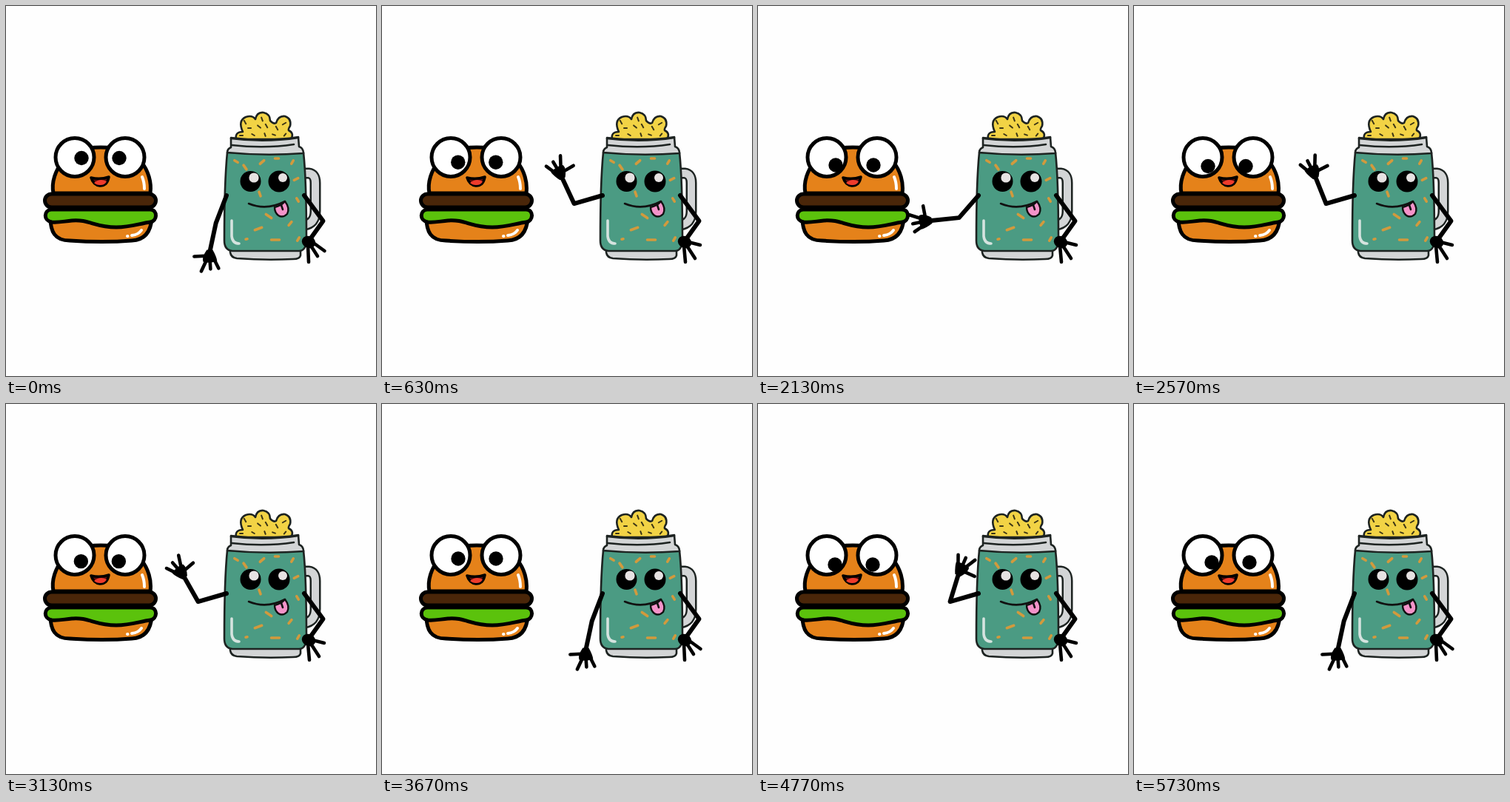
These frames come from a looping animation (500x500 px, 5760 ms). An HTML page:

```html
<!DOCTYPE html>
<html lang="en">
<head>
<meta charset="utf-8">
<title>Burger and mug</title>
<style>
  html, body { margin: 0; width: 100%; height: 100%; overflow: hidden; background: #fefefe; }
  svg { display: block; width: 100vw; height: 100vh; }
  .line { fill: none; stroke-linecap: round; stroke-linejoin: round; }
  .thick { stroke: #000; stroke-width: 5; stroke-linejoin: round; }
  .thin { stroke: #1d2321; stroke-width: 2.6; stroke-linejoin: round; stroke-linecap: round; }
  .arm { stroke: #000; stroke-width: 6; }
  .finger { stroke: #000; stroke-width: 4.6; }
  .shine { stroke: #fff; }
  .bun { fill: #e5821a; }
  .glass { fill: #d3d5d6; }
</style>
</head>
<body>
<svg viewBox="0 0 500 500">
  <g id="burger">
    <path class="thick bun" d="M64 253C61 238 67 222 76 211C87 196 105 191 128 191C153 191 172 198 183 211C192 222 197 238 195 253Z"/>
    <path class="line shine" stroke-width="4" d="M184 231Q187 238 187 247"/>
    <path class="thick bun" d="M60 286C60 305 66 317 86 317C115 319 145 319 170 317C188 316 196 304 197 286Z"/>
    <path class="line shine" stroke-width="4" d="M164 311h.5M170 310Q179 309 183 303"/>
    <path class="thick" fill="#5bc20c" d="M61 275H195C206 276 204 291 195 292C180 294 169 299 149 299C120 299 112 288 89 290C78 291 70 293 62 292C50 290 51 276 61 275Z"/>
    <rect class="thick" fill="#4a2609" x="52.5" y="254" width="150" height="18" rx="9"/>
    <g class="thick" fill="#fff">
      <circle cx="93" cy="204.500" r="26"/>
      <circle cx="161" cy="204.500" r="26"/>
    </g>
    <g id="pupils">
      <circle r="9.700"/>
      <circle cx="51" r="9.700"/>
    </g>
    <path fill="#5d0d0a" stroke="#000" stroke-width="3.600" stroke-linejoin="round" d="M115 232Q127 235 139 231Q137 243 127 243Q118 242 115 232Z"/>
    <path fill="#ee3b2c" d="M119 239Q127 232 136 237Q134 242 127 242Q122 242 119 239Z"/>
  </g>

  <g id="mug">
    <path class="line" stroke="#1d2321" stroke-width="15" d="M403 226H409Q418 227 418 239V277Q418 294 403 296"/>
    <path class="line glass" style="fill:none" stroke="#d3d5d6" stroke-width="10" d="M403 226H409Q418 227 418 239V277Q418 294 403 296"/>
    <path class="thin" fill="#f2d345" d="M311 180Q309 170 320 170Q313 155 324 150Q333 147 337 153Q339 143 348 144Q357 146 357 155Q362 160 365 158Q368 148 377 149Q386 152 384 162Q381 167 382 168Q390 172 385 180Z"/>
    <g id="kernels" class="line" stroke="#3b3516" stroke-width="2"></g>
    <path class="thin glass" d="M303 329H398V337Q397 342 388 342Q350 344 312 341Q304 340 303 333Z"/>
    <path class="thin" fill="#4b9b83" d="M299 198H402Q406 235 406 317Q405 331 396 331H306Q295 330 295 317Q295 238 299 198Z"/>
    <path class="thin glass" d="M304 178Q350 184 395 177L396 190Q402 192 402 199Q350 203 299 198Q299 193 304 191Z"/>
    <path class="line thin" stroke-width="1.500" d="M305 188Q350 193 389 187M304 179Q350 185 395 178"/>
    <g id="sprinkles" class="line" stroke="#d29a3d" stroke-width="3.600"></g>
    <path class="line" stroke="#d5e3df" stroke-width="3.600" d="M305 290V311Q306 321 315 321"/>
    <circle cx="330.500" cy="237" r="14"/>
    <circle cx="369" cy="237" r="14.500"/>
    <circle cx="335" cy="232" r="6.600" fill="#e6e2e2"/>
    <circle cx="374" cy="232" r="6" fill="#e6e2e2"/>
    <path fill="#f493c9" stroke="#111" stroke-width="2.400" stroke-linejoin="round" d="M363 272Q372 270 377 264Q384 273 380 281Q374 287 368 283Q363 279 363 272Z"/>
    <path class="line" stroke="#111" stroke-width="2.600" d="M328 267Q352 277 377 264M372 269L374 275"/>
  </g>

  <g id="rightArm">
    <path class="line arm" d="M403 256L428.500 290.500L411 315"/>
    <path class="line finger" id="rightFingers"/>
    <ellipse cx="409" cy="319" rx="9.500" ry="8" transform="rotate(25 409 319)"/>
  </g>

  <g id="leftArm">
    <path class="line arm" id="limb"/>
    <g id="hand">
      <path class="line finger" d="M2 -5L21 -6M3 -8L11.500 -26M0 -8L-1 -23M-4 -6L-12 -22"/>
      <path d="M-4 3Q-9 -6 -10 -12Q0 -16 9 -13Q11 -7 4 3Z"/>
    </g>
  </g>
</svg>
<script>
const LOOP = 5760, WAVE = 1920;
const $ = id => document.getElementById(id);

// Each mark: x, y, angle, length
const marks = list => list.map(([x, y, a, l]) => {
  const dx = Math.cos(a * Math.PI / 180) * l / 2, dy = Math.sin(a * Math.PI / 180) * l / 2;
  return `<path d="M${x - dx} ${y - dy}L${x + dx} ${y + dy}"/>`;
}).join("");

$("sprinkles").innerHTML = marks([
  [311, 210, 30, 5], [323, 218, 55, 7], [346, 211, -40, 7], [366, 206, 0, 5], [387, 211, -60, 5],
  [392, 234, -25, 6], [343, 254, 70, 6], [394, 262, 60, 5], [355, 284, 35, 9],
  [341, 301, -20, 10], [325, 315, -15, 2], [364, 316, 0, 11], [384, 294, -50, 6], [395, 315, -60, 5]
]);
$("kernels").innerHTML = marks([
  [323, 157, 60, 5], [329, 165, 0, 4], [346, 153, 70, 5], [342, 163, 40, 5], [352, 162, 60, 5],
  [366, 165, 60, 5], [376, 159, -30, 5], [318, 175, 0, 4], [334, 174, 30, 4], [350, 174, 70, 4],
  [362, 174, 20, 4], [377, 174, -50, 4]
]);

// Smooth curve through [time, value] keys; flat at turning points
function track(keys) {
  const slope = i => {
    if (i <= 0 || i >= keys.length - 1) return 0;
    const [a, b, c] = keys.slice(i - 1, i + 2);
    const s = (b[1] - a[1]) / (b[0] - a[0]), u = (c[1] - b[1]) / (c[0] - b[0]);
    return s * u <= 0 ? 0 : 2 * s * u / (s + u);
  };
  return t => {
    let i = 0;
    while (i < keys.length - 2 && t >= keys[i + 1][0]) i++;
    const [t0, v0] = keys[i], [t1, v1] = keys[i + 1];
    const d = t1 - t0, p = Math.min(1, Math.max(0, (t - t0) / d)), q = 1 - p;
    return v0 * q * q * (1 + 2 * p) + v1 * p * p * (3 - 2 * p)
      + d * p * q * (slope(i) * q - slope(i + 1) * p);
  };
}

// Angles are clockwise from straight up
const upper = track([[0, -159], [210, -139], [430, -106], [1290, -106], [1490, -128], [1700, -159], [1920, -159]]);
const fore = track([[0, -168], [210, -96], [650, -22], [930, 17], [1270, -43], [1490, -105], [1700, -168], [1920, -168]]);
const palm = track([[0, -180], [210, -98], [650, -24], [930, 27], [1270, -54], [1490, -112], [1700, -180], [1920, -180]]);
const spread = track([[0, 1], [180, 0], [1560, 0], [1740, 1], [1920, 1]]);

const pupilX = track([[0, 102], [1270, 104], [2130, 105], [2570, 100], [3670, 103], [4770, 104], [5730, 105], [5760, 105]]);
const pupilY = track([[0, 205.5], [1270, 217], [2130, 215], [2570, 216.5], [3670, 209], [4770, 217], [5730, 214], [5760, 214]]);

const reach = ([x, y], angle, length) => {
  const a = angle * Math.PI / 180;
  return [x + Math.sin(a) * length, y - Math.cos(a) * length];
};

function draw(now) {
  const t = now % LOOP, w = t % WAVE;
  const shoulder = [298, 256];
  const elbow = reach(shoulder, upper(w), 40);
  const wrist = reach(elbow, fore(w), 40);
  $("limb").setAttribute("d", `M${shoulder}L${elbow}L${wrist}`);
  $("hand").setAttribute("transform", `translate(${wrist}) rotate(${palm(w)})`);

  const s = spread(w);
  $("rightFingers").setAttribute("d",
    `M408 324L${410 - s} 346M412 324L${423 - 2 * s} ${341 - 3 * s}M414 319L${430 + s / 2} ${323 + 8 * s}`);
  $("pupils").setAttribute("transform", `translate(${pupilX(t)} ${pupilY(t)})`);
}

const start = performance.now();
function frame() {
  draw(performance.now() - start);
  requestAnimationFrame(frame);
}
frame();
</script>
</body>
</html>
```
